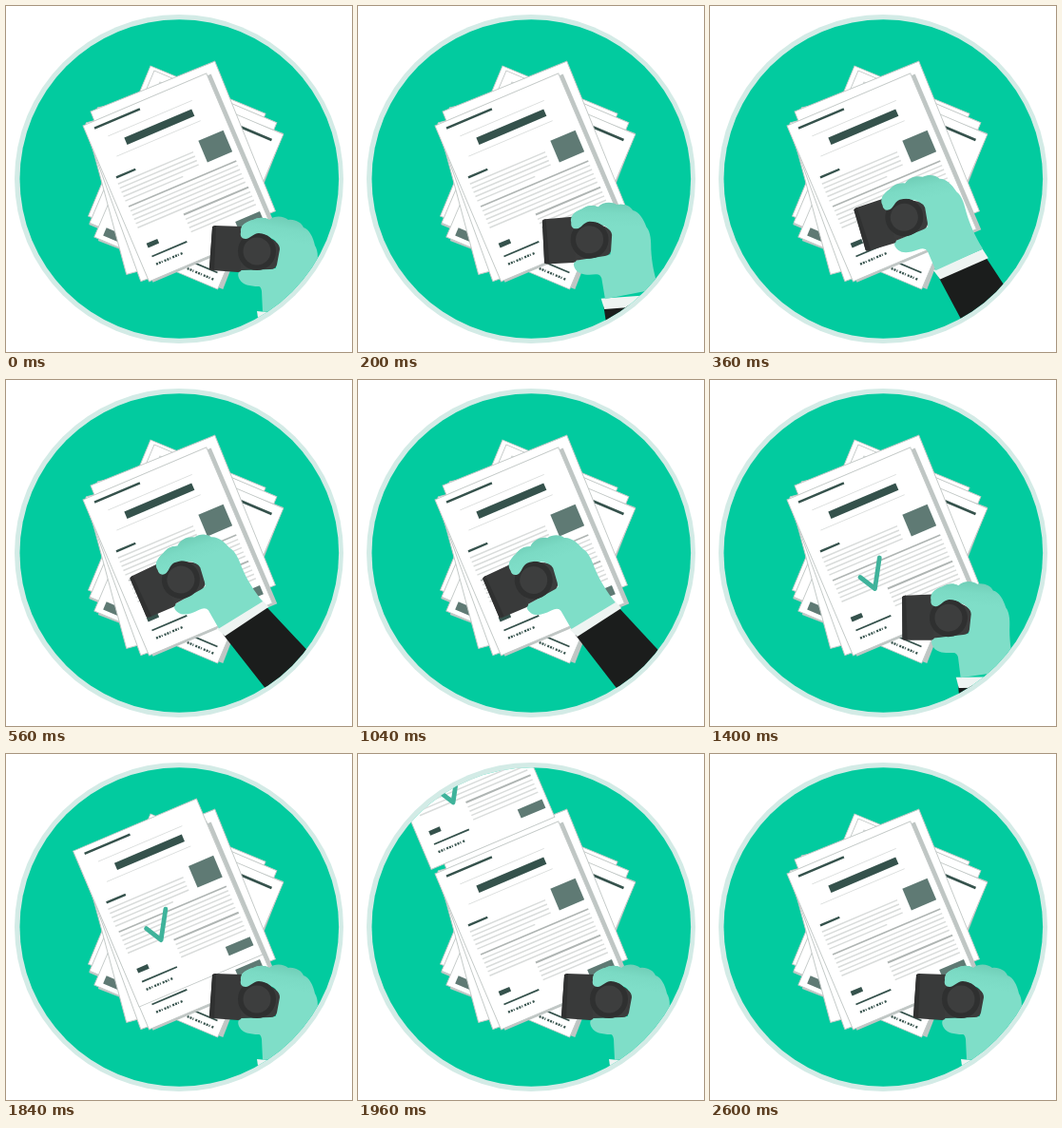
Animation, 364 px wide and 364 px high, one loop 2.64 s. Source, as an HTML page with a canvas:

```html
<!DOCTYPE html>
<html lang="en">
<head>
<meta charset="utf-8">
<title>Stamping documents</title>
<style>
html, body { margin: 0; width: 100%; height: 100%; overflow: hidden; background: #fff; }
canvas { display: block; }
</style>
</head>
<body>
<canvas id="stage" width="364" height="364"></canvas>
<script>
const ctx = document.getElementById('stage').getContext('2d');
const LOOP = 2640, STEP = 40;
const DARK = '#35524c', SLATE = '#5f7a74', LINE = '#d9dcdb', MID = '#afb5b3', SHADE = '#bfc6c4';
const rad = deg => deg * Math.PI / 180;
const clamp = x => Math.min(1, Math.max(0, x));
const ease = x => x < 0.5 ? 2 * x * x : 1 - 2 * (1 - x) * (1 - x);

const skin = ctx.createLinearGradient(290, 221, 286, 246);
skin.addColorStop(0, '#6fcdb6');
skin.addColorStop(0.5, '#7bdac4');
skin.addColorStop(1, '#7fdec8');

function at(x, y, deg, draw) {
  ctx.save();
  ctx.translate(x, y);
  ctx.rotate(rad(deg));
  draw();
  ctx.restore();
}

function rect(color, x, y, w, h) {
  ctx.fillStyle = color;
  ctx.fillRect(x, y, w, h);
}

function disc(color, x, y, r) {
  ctx.fillStyle = color;
  ctx.beginPath();
  ctx.arc(x, y, r, 0, 7);
  ctx.fill();
}

function shape(color, d) {
  ctx.fillStyle = color;
  ctx.fill(new Path2D(d));
}

function rows(x, y, w, n) {
  for (let i = 0; i < n; i++) rect(LINE, x, y + i * 4.8, w, 1.5);
}

function blank(w, h) {
  rect('#fff', 0, 0, w, h);
  ctx.strokeStyle = '#c3c9c7';
  ctx.lineWidth = 0.9;
  ctx.strokeRect(0, 0, w, h);
}

function dots(x, y) {
  for (let i = 0; i < 10; i++) rect(DARK, x + i * 3.1, y, i % 3 === 2 ? 1 : 2, 2.4);
}

function page() {
  blank(141, 178);
  rect(DARK, 10, 6, 52, 2.4);
  rect(LINE, 20, 20, 96, 0.8);
  rect(DARK, 35, 28.5, 77, 8);
  rect(LINE, 20, 43, 96, 0.8);
  rect(SLATE, 105.5, 62, 28.5, 24.5);
  rect(DARK, 11, 62.5, 22, 2.4);
  rows(10, 70, 86, 4);
  rows(10, 89.5, 66, 1);
  rect(MID, 11, 96.3, 123, 1.6);
  rows(11, 101.3, 123, 5);
  rect(MID, 61, 126.5, 74, 2);
  rows(61, 132, 74, 4);
  rect(DARK, 13, 140, 12.5, 5);
  rect(DARK, 13, 154, 40, 1.8);
  dots(14, 163);
  rect(SLATE, 108, 155.5, 28, 10);
}

function stack() {
  at(152, 63, 22.5, () => blank(131, 171));
  at(156, 68, 23, () => {
    rect(SHADE, 0, 0, 139, 176);
    blank(140, 174);
  });
  at(160.5, 83, 21.2, () => rect(SHADE, 0, 0, 141, 176));
  at(162, 80, 23, () => {
    blank(141, 177);
    rect(DARK, 80, 9, 52, 2.6);
    rect(SLATE, 8, 163, 16, 9);
    rect(DARK, 92, 160, 42, 1.8);
    dots(103, 168);
  });
  at(96, 107, -12, () => blank(118, 120));
  at(84, 123, -15, () => blank(135, 165));
  at(89, 111, -22, () => blank(141, 170));
  at(83, 128, -20, () => blank(138, 172));
  at(85, 127, -23, () => rect(SHADE, 0, 0, 142, 178));
}

function check() {
  ctx.strokeStyle = '#3fb39b';
  ctx.lineWidth = 4.8;
  ctx.lineCap = ctx.lineJoin = 'round';
  ctx.stroke(new Path2D('M158 207.5 L173.5 219.5 L178.3 187'));
  ctx.lineCap = 'butt';
  ctx.lineJoin = 'miter';
}

function sleeve() {
  shape('#1b1d1c', 'M277 329 L331 325 L361 430 L297 434Z');
  shape('#eef4f2', 'M274 321 L330 315 L333 326 L278 332Z');
}

function hand(p) {
  const rest = 1 - p;
  const slide = -10 * rest * rest;
  const wrist = 276 + slide * 0.6;
  ctx.save();
  ctx.translate(263 - 80 * p, 258 - 47.5 * p);
  ctx.rotate(rad(-27.3 * p));
  ctx.translate(-263, -258);

  at(274 + slide, 321, 12 * rest, () => {
    ctx.translate(-274, -321);
    sleeve();
  });

  shape(skin, `M247 238 C246 231 252 227 260 225 C266 222 272 222 277 225
    C283 220 292 221 297 225 C304 224 311 228 313 233 C319 235 323 243 325 252
    C329 258 328 268 327 276 C326 290 327 303 330 318 L${wrist} 322 L${wrist - 1} 300
    Q${wrist - 2} 295 266 295 C256 295 249 293 246 288 C243 283 244 279 248 278
    L284 276 L284 246 L262 239 C256 245 249 246 247 238Z`);
  shape('#393a3a', 'M220 231 L249 232 Q251 232 251 235 L248 277 Q247 280 244 280 L216 278 Q213 277 214 274 L217 234 Q217 231 220 231Z');
  shape('#303131', 'M217 232 L221 231 L219 278 L214 277Z');
  shape('#3b3c3c', 'M247 242 L272 242 Q288 247 288 256 L285 272 Q284 277 278 277 L247 278Z');
  disc('#2f3030', 264, 258, 20);
  disc('#3d3e3e', 264, 258, 14.5);
  shape(skin, `M247 238 C246 231 252 227 260 225 C266 222 272 222 277 225
    L293 226 L289 253 C282 245 276 240 266 239 C260 239 257 245 252 245
    C248 245 246 242 247 238Z`);
  ctx.restore();
}

function draw(t) {
  const p = ease(clamp(t / 560)) - ease(clamp((t - 1000) / 560));
  const lift = t > 1800 ? 26 * Math.pow((t - 1800) / 40, 1.41) : 0;

  rect('#fff', 0, 0, 364, 364);
  disc('#d3ebe6', 182, 182, 173);
  ctx.save();
  ctx.beginPath();
  ctx.arc(182.3, 182, 167.8, 0, 7);
  ctx.clip();
  rect('#02cb9f', 0, 0, 364, 364);
  stack();
  at(81, 126, -23, page);
  if (t >= 600 && lift < 320) {
    ctx.save();
    ctx.translate(-0.4 * lift, -0.918 * lift);
    if (lift) at(81, 126, -23, page);
    check();
    ctx.restore();
  }
  hand(p);
  ctx.restore();
}

function tick() {
  draw(Math.floor(performance.now() % LOOP / STEP) * STEP);
  requestAnimationFrame(tick);
}
tick();
</script>
</body>
</html>
```
